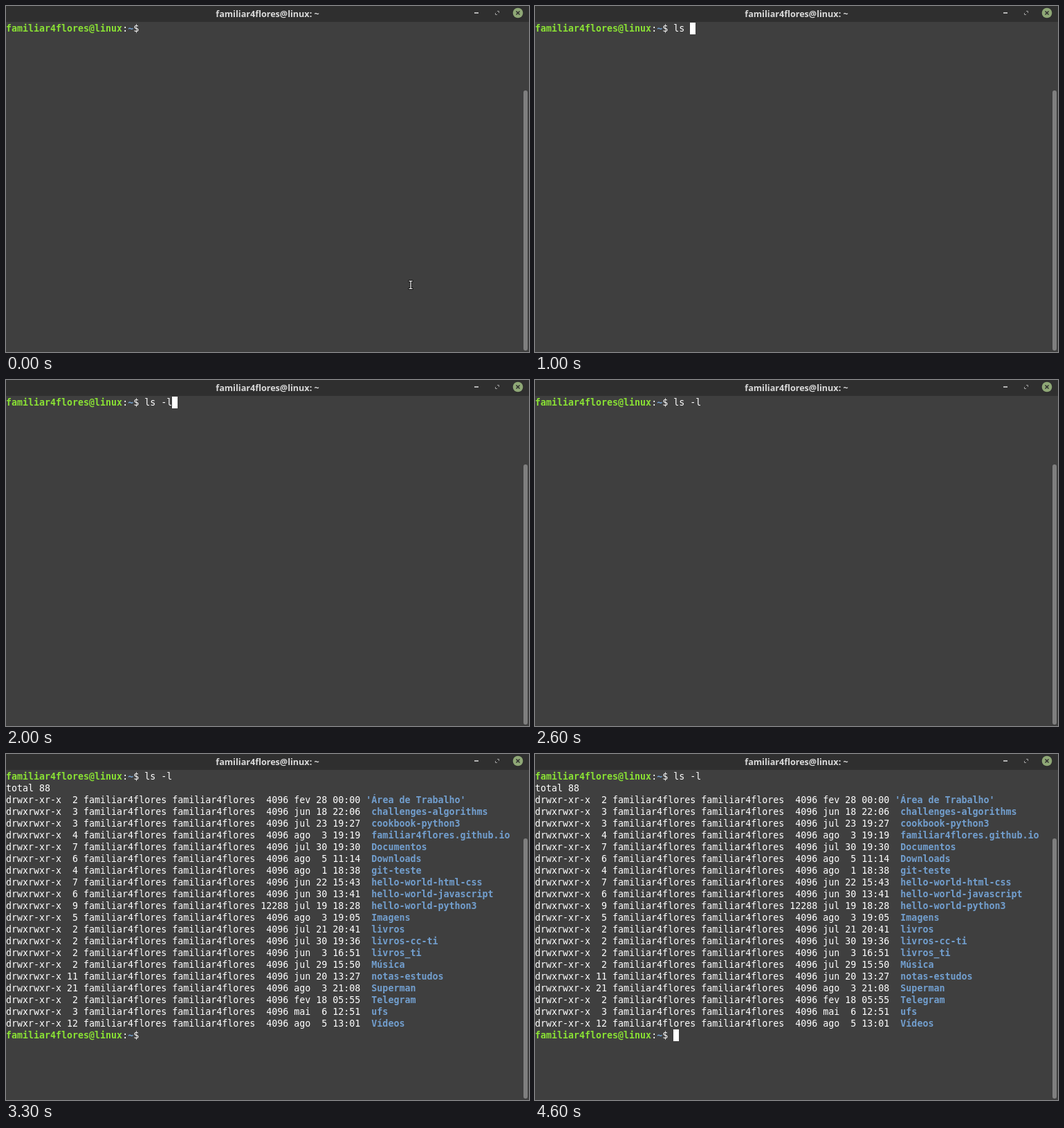
Write an HTML page that moves like this. It is 756x500 px and loops after 4800 ms.

```html
<!DOCTYPE html>
<html lang="pt">
<head>
<meta charset="utf-8">
<title>Terminal</title>
<style>
  html, body { margin: 0; width: 100%; height: 100%; overflow: hidden; background: #3f3f3f; }
  #bar {
    position: absolute; left: 0; top: 0; width: 756px; height: 23px;
    background: #2f2f2f; color: #dadada; text-align: center;
    font: 600 12.6px/23px "Noto Sans", sans-serif;
  }
  #screen {
    position: absolute; left: 0; top: 24px; margin: 0; color: #fff;
    font: 13.3px/17px "DejaVu Sans Mono", monospace;
  }
  #screen b { color: #729fcf; }
  #screen b.host { color: #8ae234; }
  #caret { position: absolute; width: 8px; height: 17px; background: #fff; }
  svg { position: absolute; left: 0; top: 0; }
</style>
</head>
<body>
<div id="bar"></div>
<pre id="screen"></pre>
<div id="caret"></div>
<svg width="756" height="500" fill="none">
  <path d="M677 10h6" stroke="#b4b4b4" stroke-width="2"/>
  <path d="M710 7.5h2.5v2.5M707.5 10v2.5h2.5" stroke="#a0a0a0"/>
  <circle cx="740" cy="10" r="7.3" fill="#8fa876"/>
  <path d="M737.5 7.5l5 5m0-5l-5 5" stroke="#2f2f2f" stroke-width="1.5"/>
  <rect x="748" y="122" width="6" height="376" rx="3" fill="#7f7f7f"/>
  <g id="pointer" stroke-linecap="square">
    <path id="beam" d="M583 397.5h4M585 397.5v11M583 408.5h4" stroke="#111" stroke-width="3"/>
    <path d="M583 397.5h4M585 397.5v11M583 408.5h4" stroke="#fff" stroke-width="1.2"/>
  </g>
</svg>
<script>
const LOOP = 4800, CELL = 8, ROW = 17, TOP = 24;
const POINTER_HIDES = 400;
const user = 'familiar4flores';
const host = `${user}@linux`;
const prompt = `<b class="host">${host}</b>:<b>~</b>$ `;
const promptLength = `${host}:~$ `.length;
const command = 'ls -l';

// group write bit | links | size | date | name
const entries = `
r 2 4096 fev 28 00:00 'Área de Trabalho'
w 3 4096 jun 18 22:06 challenges-algorithms
w 3 4096 jul 23 19:27 cookbook-python3
w 4 4096 ago 3 19:19 ${user}.github.io
r 7 4096 jul 30 19:30 Documentos
r 6 4096 ago 5 11:14 Downloads
w 4 4096 ago 1 18:38 git-teste
w 7 4096 jun 22 15:43 hello-world-html-css
w 6 4096 jun 30 13:41 hello-world-javascript
w 9 12288 jul 19 18:28 hello-world-python3
r 5 4096 ago 3 19:05 Imagens
w 2 4096 jul 21 20:41 livros
w 2 4096 jul 30 19:36 livros-cc-ti
w 2 4096 jun 3 16:51 livros_ti
r 2 4096 jul 29 15:50 Música
w 11 4096 jun 20 13:27 notas-estudos
w 21 4096 ago 3 21:08 Superman
r 2 4096 fev 18 05:55 Telegram
w 3 4096 mai 6 12:51 ufs
r 12 4096 ago 5 13:01 Vídeos`.trim().split('\n');

function formatEntry(entry) {
  const [mode, links, size, month, day, time, ...words] = entry.split(' ');
  const name = words.join(' ');
  const group = mode === 'w' ? 'rwx' : 'r-x';
  const pad = name[0] === "'" ? '' : ' ';
  return `drwx${group}r-x ${links.padStart(2)} ${user} ${user} ${size.padStart(5)} ` +
    `${month} ${day.padStart(2)} ${time} ${pad}<b>${name}</b>`;
}
const listing = ['total 88', ...entries.map(formatEntry)];

// [start in ms, typed characters, caret shown, listing shown]
const steps = [
  [0, 0, false], [200, 0, true], [500, 1, true], [700, 2, true],
  [1000, 3, true], [1500, 3, false], [1600, 4, true], [2000, 5, true],
  [2600, 5, false], [2700, 5, true, true], [3300, 5, false, true],
  [3900, 5, true, true], [4500, 5, false, true], [4600, 5, true, true]
];

const find = id => document.getElementById(id);
const screenBox = find('screen'), caret = find('caret'), pointer = find('pointer');
const setVisible = (node, on) => { node.style.visibility = on ? 'visible' : 'hidden'; };
find('bar').textContent = `${host}: ~`;

function show([, typed, caretOn, listed]) {
  const lines = [prompt + command.slice(0, typed)];
  if (listed) lines.push(...listing, prompt);
  screenBox.innerHTML = lines.join('\n');
  caret.style.left = (promptLength + (listed ? 0 : typed)) * CELL + 'px';
  caret.style.top = TOP + (lines.length - 1) * ROW + 'px';
  setVisible(caret, caretOn);
}

let current;
function draw(now) {
  const t = now % LOOP;
  const step = steps.findLast(([start]) => start <= t);
  setVisible(pointer, t < POINTER_HIDES);
  if (step !== current) show(current = step);
  requestAnimationFrame(draw);
}
draw(performance.now());
</script>
</body>
</html>
```
